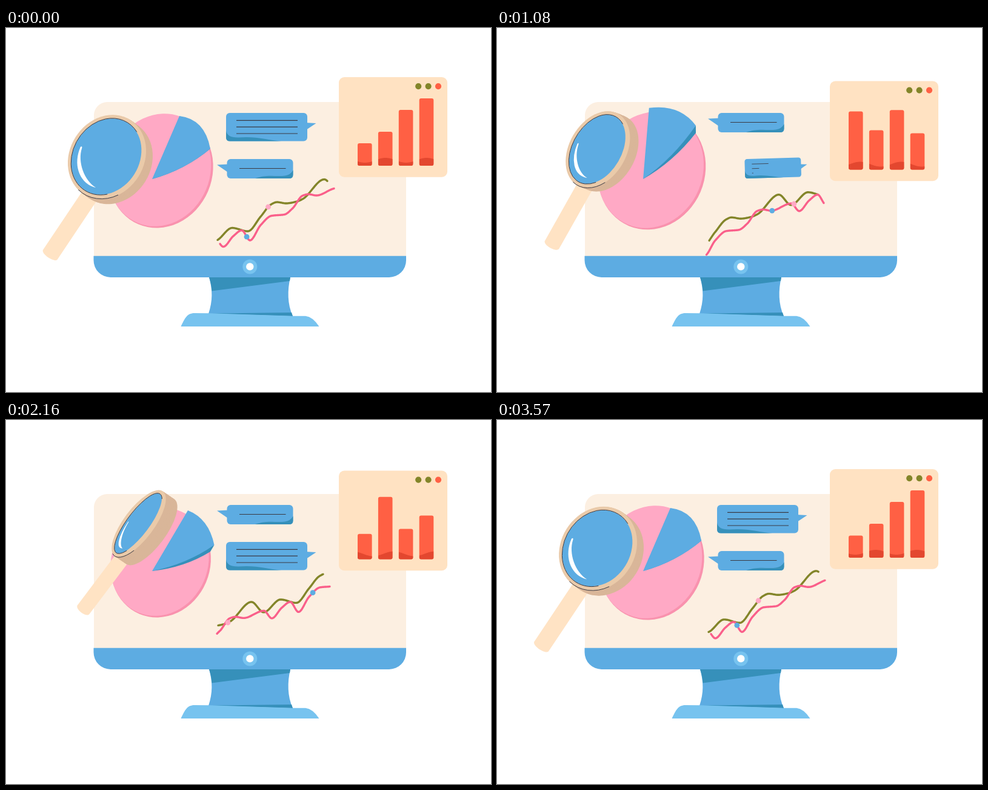
Recreate the animation shown at these times as an HTML page with a canvas. Size 800 px wide and 600 px high, loop 3.6 s.

```html
<!DOCTYPE html>
<html lang="en">
<head>
<meta charset="utf-8">
<title>Analytics dashboard</title>
<style>
  html, body { margin: 0; width: 800px; height: 600px; overflow: hidden; background: #fff; }
  canvas { display: block; }
</style>
</head>
<body>
<canvas id="stage" width="800" height="600"></canvas>
<script>
const ctx = document.getElementById('stage').getContext('2d');
const LOOP = 3600;
const BLUE = '#5dace2', TEAL = '#3690ba', SKY = '#77c3ef', INK = '#3a3a44';
const CREAM = '#fcefe1', PEACH = '#ffe2c2', PINK = '#ffa9c5', ROSE = '#f992ae';
const OLIVE = '#838529', RED = '#ff6044', LINE_PINK = '#fa5f8a';

const clamp = v => Math.max(0, Math.min(1, v));
const ease = (t, from, to) => (1 - Math.cos(Math.PI * clamp((t - from) / (to - from)))) / 2;
const mix = (a, b, k) => a + (b - a) * k;

// Cubic through points that repeat every `span`, gaining `gain` each time; flat at extrema.
function curve(xs, ys, span, gain = 0) {
  const n = xs.length;
  const X = i => xs[((i % n) + n) % n] + Math.floor(i / n) * span;
  const Y = i => ys[((i % n) + n) % n] + Math.floor(i / n) * gain;
  const slope = i => (Y(i + 1) - Y(i)) / (X(i + 1) - X(i));
  const tangent = i => {
    const a = slope(i - 1), b = slope(i);
    return a * b <= 0 ? 0 : 2 * a * b / (a + b);
  };
  return x => {
    const turns = Math.floor((x - xs[0]) / span);
    const r = x - turns * span;
    let i = 0;
    while (i < n - 1 && X(i + 1) <= r) i++;
    const h = X(i + 1) - X(i), s = (r - X(i)) / h, s2 = s * s, s3 = s2 * s;
    return (2 * s3 - 3 * s2 + 1) * Y(i) + (s3 - 2 * s2 + s) * h * tangent(i)
      + (3 * s2 - 2 * s3) * Y(i + 1) + (s3 - s2) * h * tangent(i + 1) + turns * gain;
  };
}

const KEYS = [0, 840, 1410, 2160, 2520, 3030];
const track = (...v) => curve(KEYS, v, LOOP);
const sample = (set, t) => Object.fromEntries(Object.entries(set).map(([k, f]) => [k, f(t)]));

function fill(color, build) {
  ctx.fillStyle = color;
  ctx.beginPath();
  build();
  ctx.fill();
}
function stroke(color, width, build) {
  ctx.strokeStyle = color;
  ctx.lineWidth = width;
  ctx.beginPath();
  build();
  ctx.stroke();
}
const shape = (color, d) => { ctx.fillStyle = color; ctx.fill(new Path2D(d)); };
const dot = (x, y, r, color) => fill(color, () => ctx.arc(x, y, r, 0, 7));
const box = (x, y, w, h, r, color) => fill(color, () => ctx.roundRect(x, y, w, h, r));
const oval = (x, y, rx, ry, rot, color) =>
  fill(color, () => ctx.ellipse(x, y, rx, ry, rot, 0, 2 * Math.PI));

function monitor() {
  box(145, 122, 515, 260, [22, 22, 0, 0], CREAM);
  box(144.5, 375.7, 515.5, 35.3, [0, 0, 28, 28], BLUE);
  dot(402.3, 393.4, 12, SKY);
  dot(402.3, 393.4, 6.2, '#fff');
  shape(BLUE, 'M335 411H469C464 432 464 455 473 475L334 471C341 450 341 432 335 411Z');
  shape(TEAL, 'M335 411H469L468 417L339.500 433.500Q338.500 421 335 411Z');
  shape(TEAL, 'M338 470.500L471 469L473 475Z');
  shape(SKY, 'M288.500 492C295 479 298 470 311 470L337 470.300L473 474.700H494Q506 476 516.500 492Z');
}

const pieScale = track(1, 1.02, 1.042, .957, 1.01, 1.02);
const wedge = {
  ax: track(286, 258, 245, 300, 282, 280), ay: track(145, 132.5, 131.5, 149, 135, 134),
  cx: track(328, 307.5, 295.5, 334.5, 329.5, 329.5), cy: track(150, 126, 124, 162.5, 143.5, 143),
  bx: track(337, 331.5, 324, 343.5, 343.5, 341), by: track(199, 167, 156, 206, 186, 184.5),
  dx: track(337, 331, 325, 337, 338, 337), dy: track(199, 179.5, 167.5, 217, 201, 197.5)
};
const toApex = (x, y) => ctx.quadraticCurveTo((x + 241) / 2 + 6, (y + 249) / 2 + 10, 241, 249);

function pie(t) {
  const s = pieScale(t), tilt = .4;
  oval(255.5, 236, 84.5 * s, 95 * s, tilt, ROSE);
  oval(253.5, 234, 83 * s, 94.500 * s, tilt, PINK);
  const w = sample(wedge, t);
  fill(TEAL, () => {
    ctx.moveTo(241, 249);
    ctx.lineTo(w.bx, w.by);
    ctx.lineTo(w.dx, w.dy);
    toApex(w.dx, w.dy);
  });
  fill(BLUE, () => {
    ctx.moveTo(241, 249);
    ctx.lineTo(w.ax, w.ay);
    ctx.quadraticCurveTo(w.cx, w.cy, w.bx, w.by);
    toApex(w.bx, w.by);
  });
}

// Both graphs are endless rising waves that slide left and down.
const SHIFT = 200, RISE = 84;
const graphs = [
  {
    color: OLIVE, dotColor: PINK, from: 1815,
    wave: curve([325, 345, 373, 399, 420, 437, 447, 462, 478, 490],
      [333.5, 350.5, 329.5, 335, 311, 291, 287, 289, 286.5, 281.5], SHIFT, -RISE),
    left: track(349, 352, 347, 350, 350, 349), right: track(530, 527, 532, 523, 527, 533),
    dotT: [1815, 2160, 2520, 3030, 3600, 4440, 5010, 5390],
    dotX: [349, 366, 383, 406, 432.5, 478, 506, 527]
  },
  {
    color: LINE_PINK, dotColor: BLUE, from: 2545,
    wave: curve([345.5, 358.5, 375, 389, 402.5, 420, 438, 459, 473, 489, 499, 512],
      [348, 360.5, 343, 333.5, 350, 325, 309.5, 307.5, 297, 276.5, 274, 276], SHIFT, -RISE),
    left: track(353, 348, 343, 348, 343, 351), right: track(541, 540, 537, 534, 537, 533),
    dotT: [2545, 3030, 3600, 4440, 5010, 5760, 6080],
    dotX: [349, 374, 397, 436, 478, 506, 526]
  }
];

function graphDot(g, t, y) {
  const T = g.dotT, now = t < g.from ? t + LOOP : t;
  const i = T.findIndex((v, k) => now >= v && now < T[k + 1]);
  if (i < 0) return;
  const x = mix(g.dotX[i], g.dotX[i + 1], (now - T[i]) / (T[i + 1] - T[i]));
  dot(x, y(x), 4.4, g.dotColor);
}

function drawGraphs(t) {
  const p = t / LOOP;
  const height = g => x => g.wave(x + SHIFT * p) + RISE * p;
  ctx.lineCap = ctx.lineJoin = 'round';
  for (const g of graphs) {
    const y = height(g), end = g.right(t);
    stroke(g.color, 3.4, () => {
      for (let x = g.left(t); x < end; x += 1) ctx.lineTo(x, y(x));
      ctx.lineTo(end, y(end));
    });
  }
  for (const g of graphs) graphDot(g, t, height(g));
}

// Bubbles are drawn around the tip of the tail, from which they grow.
function atTip(x, y, scale, angle, draw) {
  if (scale < .01) return;
  ctx.save();
  ctx.translate(x, y);
  ctx.rotate(angle * Math.PI / 180);
  ctx.scale(scale, scale);
  ctx.lineCap = 'butt';
  draw();
  ctx.restore();
}
const rule = (x, y, w) => w > 0 && stroke(INK, 1.2, () => {
  ctx.moveTo(x, y);
  ctx.lineTo(x + w, y);
});

function bigBubble(y, scale, angle, drawn) {
  atTip(511.5, y + 17, scale, angle, () => {
    shape(BLUE, 'M0 0L-18 -1V12Z');
    box(-148.5, -17, 134, 46.5, 6, BLUE);
    shape(TEAL, 'M-148.500 12Q-147 24 -128 23.500C-98 21 -80 28 -57 29.500H-142.500Q-148.500 29.500 -148.500 23.500Z');
    for (let i = 0; i < 3; i++) rule(-131.5, -4.6 + 10.8 * i, 101 * drawn(i));
  });
}
function smallBubble(y, scale, angle, drawn) {
  atTip(348, y + 9.5, scale, angle, () => {
    shape(BLUE, 'M0 0L19 -1V13Z');
    box(16.5, -9.5, 109, 32, 6, BLUE);
    shape(TEAL, 'M63 22.500C83 15 97 20 112 18Q121 17 125.500 9V16.500Q125.500 22.500 119.500 22.500Z');
    rule(37, 6, 76.5 * drawn);
  });
}

function bubbles(t) {
  const lineGrow = start => ease(t, start, start + 560);

  const bigIn = ease(t, 373, 1504), bigOut = 1 - ease(t, 370, 700);
  if (t < 700) bigBubble(140 - 12 * (1 - bigOut), bigOut, 0, () => 1);
  const bigY = mix(201, 140, ease(t, 2153, 2820)) + 22 * (1 - bigIn);
  bigBubble(bigY, bigIn, -5.5 * (1 - bigIn), i => lineGrow(840 + 90 * i));

  if (t < 2500) {
    const out = ease(t, 2170, 2500);
    smallBubble(mix(216, 140, ease(t, 353, 1020)) - 12 * out, 1 - out, 0, 1);
  }
  const smallIn = ease(t, 2207, 3087);
  smallBubble(216 + 36 * (1 - smallIn), smallIn, 11 * (1 - smallIn), lineGrow(2540));
}

const lens = {
  x: track(165.5, 168, 161, 218, 202.5, 181.5), y: track(212, 214.5, 175, 170.5, 170.5, 161),
  tilt: track(.56, .576, .447, .642, .581, .443),
  a: track(65.8, 59.8, 64.4, 60.3, 62, 64.6), b: track(54.5, 43.6, 34.9, 18.3, 24, 32.7),
  sx: track(11, 13, 16, 19, 20, 18), sy: track(8.5, 5, 8, 13, 11, 7),
  topX: track(135, 141, 144, 190, 178, 164), topY: track(281, 280, 241, 230, 234, 231),
  endX: track(71, 85.5, 94.5, 125.5, 117.5, 122), endY: track(376.5, 367.5, 346.5, 315.5, 326, 332.5),
  grip: track(28.5, 26.5, 27.5, 24.5, 25.5, 28)
};

function magnifier(t) {
  const m = sample(lens, t);

  const dx = m.endX - m.topX, dy = m.endY - m.topY;
  ctx.save();
  ctx.translate(m.topX, m.topY);
  ctx.rotate(Math.atan2(dy, dx));
  const len = Math.hypot(dx, dy), half = m.grip / 2;
  fill('#ffe3c4', () => {
    ctx.moveTo(-14, -half);
    ctx.lineTo(len - 3, -half);
    ctx.bezierCurveTo(len + 4, -half + 2, len + 4, half - 2, len - 3, half);
    ctx.lineTo(-14, half);
  });
  ctx.restore();

  const rimX = m.x + 1, rimY = m.y + .5, rimA = m.a + 6.3, rimB = m.b + 6.8;
  for (let i = 16; i >= 1; i--) {
    oval(rimX + m.sx * i / 16, rimY + m.sy * i / 16, rimB, rimA, m.tilt, '#d9b699');
  }
  oval(rimX, rimY, rimB, rimA, m.tilt, '#eacaa9');
  oval(m.x, m.y, m.b, m.a, m.tilt, BLUE);

  ctx.lineCap = 'round';
  stroke(INK, 1, () => ctx.ellipse(m.x, m.y, m.b + .4, m.a + .4, m.tilt, .9, 5.1));
  stroke(INK, 1, () => ctx.ellipse(rimX, rimY, rimB, rimA, m.tilt, .65, 1.75));

  ctx.save();
  ctx.translate(m.x, m.y);
  ctx.rotate(m.tilt);
  ctx.scale(m.b, m.a);
  fill('#fff', () => {
    ctx.arc(0, 0, .83, 2.97, 1.29, true);
    ctx.bezierCurveTo(-.18, .8, -.66, .5, -.765, .14);
    ctx.quadraticCurveTo(-.79, .08, -.82, .14);
  });
  ctx.restore();
}

// Bar heights at the four rest poses.
const poses = [[37, 56, 92, 111], [111, 67.3, 100, 47], [42, 104, 49, 71], [36.5, 56, 92, 111]];

function barHeight(i, t) {
  if (t < 1500) return mix(poses[0][i], poses[1][i], ease(t, 90, 1500));
  if (t < 2100) return mix(poses[1][i], poses[2][i], ease(t, 1500, 2100));
  return mix(poses[2][i], poses[3][i], ease(t, 2100, 2700));
}

function panel(t) {
  const phase = 2 * Math.PI * t / 1800;
  ctx.save();
  ctx.translate(0, 3.6 * (1 - Math.cos(phase)));
  box(549, 81, 179, 164.7, 9, PEACH);
  [OLIVE, OLIVE, RED].forEach((c, i) => dot(680.2 + 16.4 * i, 96.1, 5.1, c));
  for (let i = 0; i < 4; i++) {
    const x = 580 + 33.9 * i, h = barHeight(i, t);
    ctx.save();
    ctx.beginPath();
    ctx.roundRect(x, 227 - h, 23.6, h, 3);
    ctx.fillStyle = RED;
    ctx.fill();
    ctx.clip();
    fill('#e3472f', () => {
      ctx.moveTo(x, 230);
      for (let k = 0; k <= 24; k++) {
        ctx.lineTo(x + k, 218 - 4 * Math.cos(.0925 * (x + k - 626) - phase));
      }
      ctx.lineTo(x + 24, 230);
    });
    ctx.restore();
  }
  ctx.restore();
}

function frame() {
  const t = performance.now() % LOOP;
  ctx.clearRect(0, 0, 800, 600);
  monitor();
  pie(t);
  drawGraphs(t);
  bubbles(t);
  magnifier(t);
  panel(t);
  requestAnimationFrame(frame);
}
frame();
</script>
</body>
</html>
```
